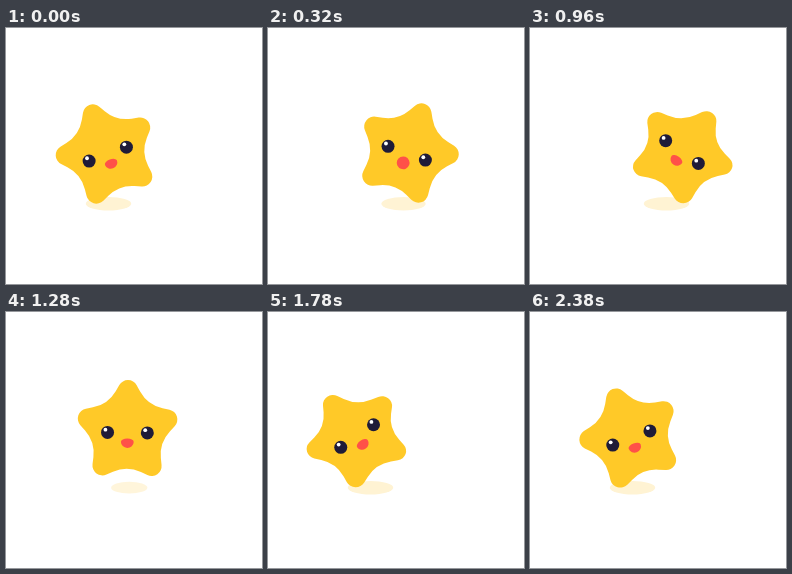
An HTML page with a canvas that plays this animation: 256x256 px, repeating every 2400 ms.

```html
<!DOCTYPE html>
<html lang="en">
<head>
<meta charset="utf-8">
<title>Hopping star</title>
<style>
  html, body { margin: 0; width: 100%; height: 100%; overflow: hidden; background: #fff; }
  canvas { display: block; width: 256px; height: 256px; }
</style>
</head>
<body>
<canvas id="stage"></canvas>
<script>
const LOOP = 2400;
const canvas = document.getElementById('stage');
const ctx = canvas.getContext('2d');
const dpr = window.devicePixelRatio || 1;
canvas.width = canvas.height = 256 * dpr;

// Tilt in degrees over time in ms
const TILT = [
  [0, -20.5], [320, 20.2], [550, 28.5], [860, 36], [960, 34.9], [1080, 32.5],
  [1280, 0.8], [1560, -23.7], [1630, -28], [1880, -36.5], [2040, -33.7],
  [2170, -31], [2385, -20.8]
];
const HOPS = [{ start: 15, end: 330 }, { start: 1160, end: 1470 }];
const FOOT = { x: 31, y: 42.5, left: 87.3, right: 153.6, ground: 176 };

const clamp = v => Math.min(1, Math.max(0, v));
const mix = (a, b, p) => a + (b - a) * p;

function key(i) {
  const n = TILT.length, turn = Math.floor(i / n);
  const [t, v] = TILT[i - turn * n];
  return [t + turn * LOOP, v];
}
const slope = i => (key(i + 1)[1] - key(i)[1]) / (key(i + 1)[0] - key(i)[0]);
function tangent(i) {
  const a = slope(i - 1), b = slope(i);
  return a * b <= 0 ? 0 : 2 * a * b / (a + b);
}

// Monotone cubic interpolation between the tilt keys
function tiltAt(t) {
  let i = TILT.length - 1;
  while (TILT[i][0] > t) i--;
  const [t0, v0] = key(i), [t1, v1] = key(i + 1);
  const d = t1 - t0, u = (t - t0) / d, w = 1 - u;
  return v0 * (1 + 2 * u) * w * w + v1 * u * u * (3 - 2 * u)
       + d * (tangent(i) * u * w * w - tangent(i + 1) * u * u * w);
}

function ellipse(x, y, rx, ry, color) {
  ctx.fillStyle = color;
  ctx.beginPath();
  ctx.ellipse(x, y, rx, ry, 0, 0, 2 * Math.PI);
  ctx.fill();
}

function starPath() {
  const point = i => {
    const r = i % 2 ? 33.7 : 62, a = i * Math.PI / 5;
    return [r * Math.sin(a), -r * Math.cos(a)];
  };
  const [ax, ay] = point(0), [bx, by] = point(1);
  const path = new Path2D();
  path.moveTo((ax + bx) / 2, (ay + by) / 2);
  for (let i = 1; i <= 10; i++) {
    path.arcTo(...point(i), ...point(i + 1), i % 2 ? 34 : 10);
  }
  path.closePath();
  return path;
}
const STAR = starPath();

function drawMouth(open) {
  const y = mix(10, 11.1, open);
  ctx.fillStyle = '#ff5148';
  ctx.beginPath();
  ctx.ellipse(0, y, 6.4, mix(3.4, 6.4, open), 0, Math.PI, 2 * Math.PI);
  ctx.ellipse(0, y, 6.4, mix(6, 6.4, open), 0, 0, Math.PI);
  ctx.fill();
}

function at(x, y, angle, paint) {
  ctx.save();
  ctx.translate(x, y);
  ctx.rotate(angle);
  paint();
  ctx.restore();
}

function draw(t) {
  const [there, back] = HOPS.map(h => clamp((t - h.start) / (h.end - h.start)));
  const side = there - back;
  const air = 4 * side * (1 - side);
  const open = Math.max(...HOPS.map(h =>
    Math.cos(clamp(Math.abs(t - h.end + 15) / 110) * Math.PI / 2) ** 2));

  // The star rocks on one foot and swaps feet during a hop
  const tilt = tiltAt(t), angle = tilt * Math.PI / 180;
  const c = Math.cos(angle), s = Math.sin(angle);
  const reach = x => x * c - FOOT.y * s;
  const drop = x => x * s + FOOT.y * c;
  const x = mix(FOOT.left - reach(-FOOT.x), FOOT.right - reach(FOOT.x), side);
  const y = FOOT.ground - mix(drop(-FOOT.x), drop(FOOT.x), side) - 14.2 * air;

  ctx.setTransform(dpr, 0, 0, dpr, 0, 0);
  ctx.fillStyle = '#fff';
  ctx.fillRect(0, 0, 256, 256);
  ctx.globalAlpha = 1 - 0.2 * air;
  ellipse(mix(102.5, 136.5, side), 175.7, 22.7 - 4.8 * air, 6.8 - air, '#fff3d3');
  ctx.globalAlpha = 1;

  // A deep lean presses the body towards the ground
  const squash = 1 - 0.042 * clamp((Math.abs(tilt) - 20) / 14);
  ctx.save();
  ctx.translate(0, FOOT.ground);
  ctx.scale(1, squash);
  at(x, y - FOOT.ground, angle, () => {
    ctx.fillStyle = '#ffc928';
    ctx.fill(STAR);
  });
  ctx.restore();

  at(x, y, angle, () => drawMouth(open));
  for (const ex of [-19.9, 19.9]) {
    const px = x + ex * c - 0.8 * s, py = y + ex * s + 0.8 * c;
    ellipse(px, py, 6.5, 6.5, '#1f1b38');
    ellipse(px - 2.1, py - 2.8, 1.9, 1.9, '#fff');
  }
}

function tick() {
  draw(performance.now() % LOOP);
  requestAnimationFrame(tick);
}
tick();
</script>
</body>
</html>
```
